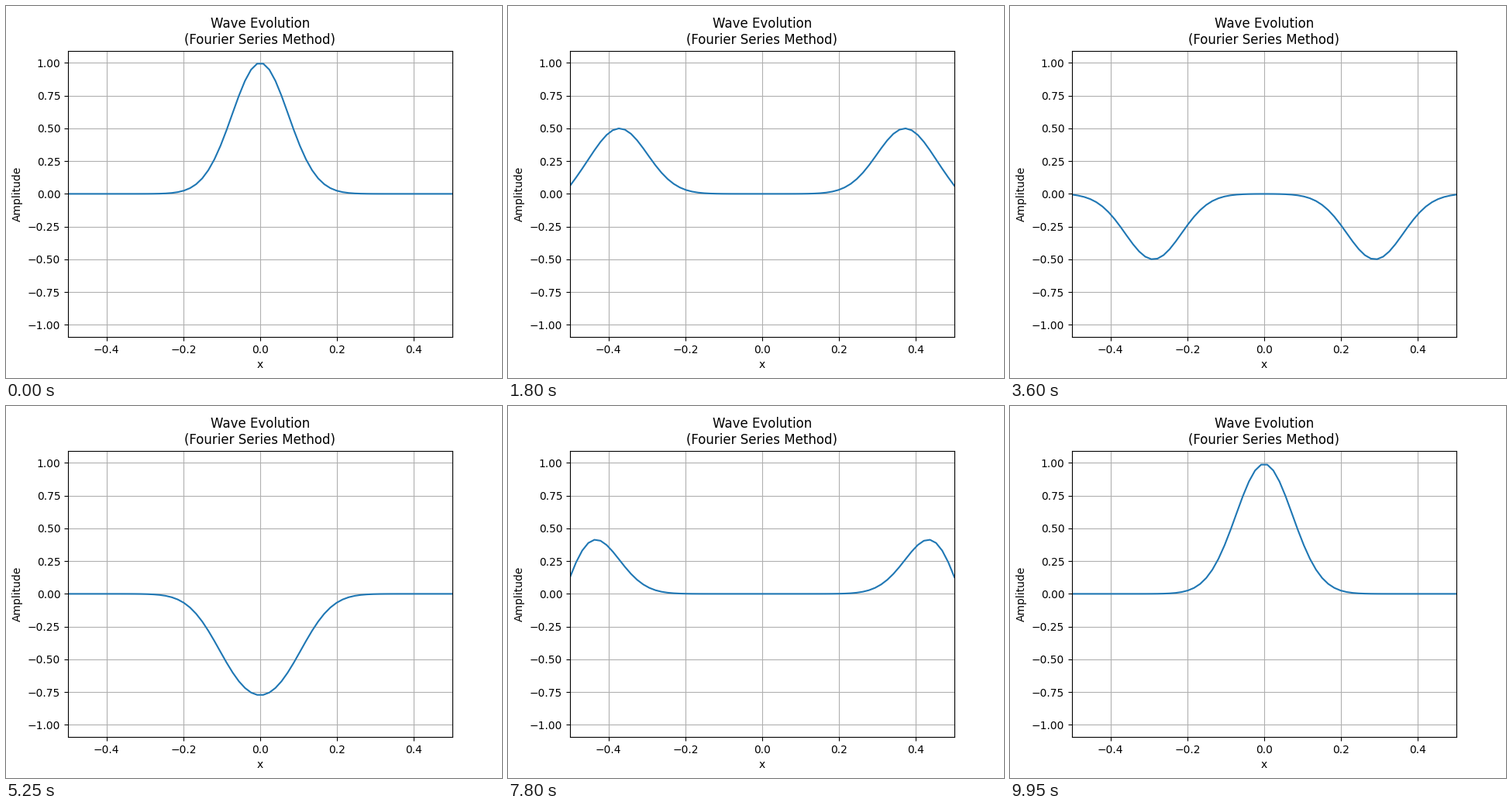
Recreate the animation shown at these times as a matplotlib script. Size 640 px wide and 480 px high, loop 10 s.

```python
import numpy as np
import matplotlib.pyplot as plt
from matplotlib.animation import FuncAnimation

FRAMES = 200
INTERVAL = 50
POINTS = 64
STEP = 0.0100065      # wave time per frame
SHARPNESS = 100       # initial pulse is exp(-SHARPNESS * s**2)

x = np.linspace(-0.5, 0.5, POINTS)
# The fixed ends lie one grid step outside the plotted points.
s = x * (POINTS - 1) / (POINTS + 1)

# Even standing modes on a unit string, with the pulse's Fourier coefficients
k = np.pi * np.arange(1, POINTS, 2)
coeffs = 2 * np.sqrt(np.pi / SHARPNESS) * np.exp(-k**2 / (4 * SHARPNESS))
modes = np.cos(np.outer(s, k)) * coeffs


def wave(frame):
    return modes @ np.cos(k * frame * STEP)


plt.rcParams["font.family"] = "DejaVu Sans"
fig, ax = plt.subplots(figsize=(6.4, 4.8), dpi=100)
line, = ax.plot(x, wave(0), color="#1f77b4", lw=1.5)

limit = 1.1 * wave(0).max()
ax.set_xlim(-0.5, 0.5)
ax.set_ylim(-limit, limit)
ax.set_xlabel("x")
ax.set_ylabel("Amplitude")
ax.set_title("Wave Evolution\n(Fourier Series Method)")
ax.grid(True)


def update(frame):
    line.set_ydata(wave(frame))
    return line,


anim = FuncAnimation(fig, update, frames=FRAMES, interval=INTERVAL,
                     repeat=True, repeat_delay=0)
plt.show()
```
